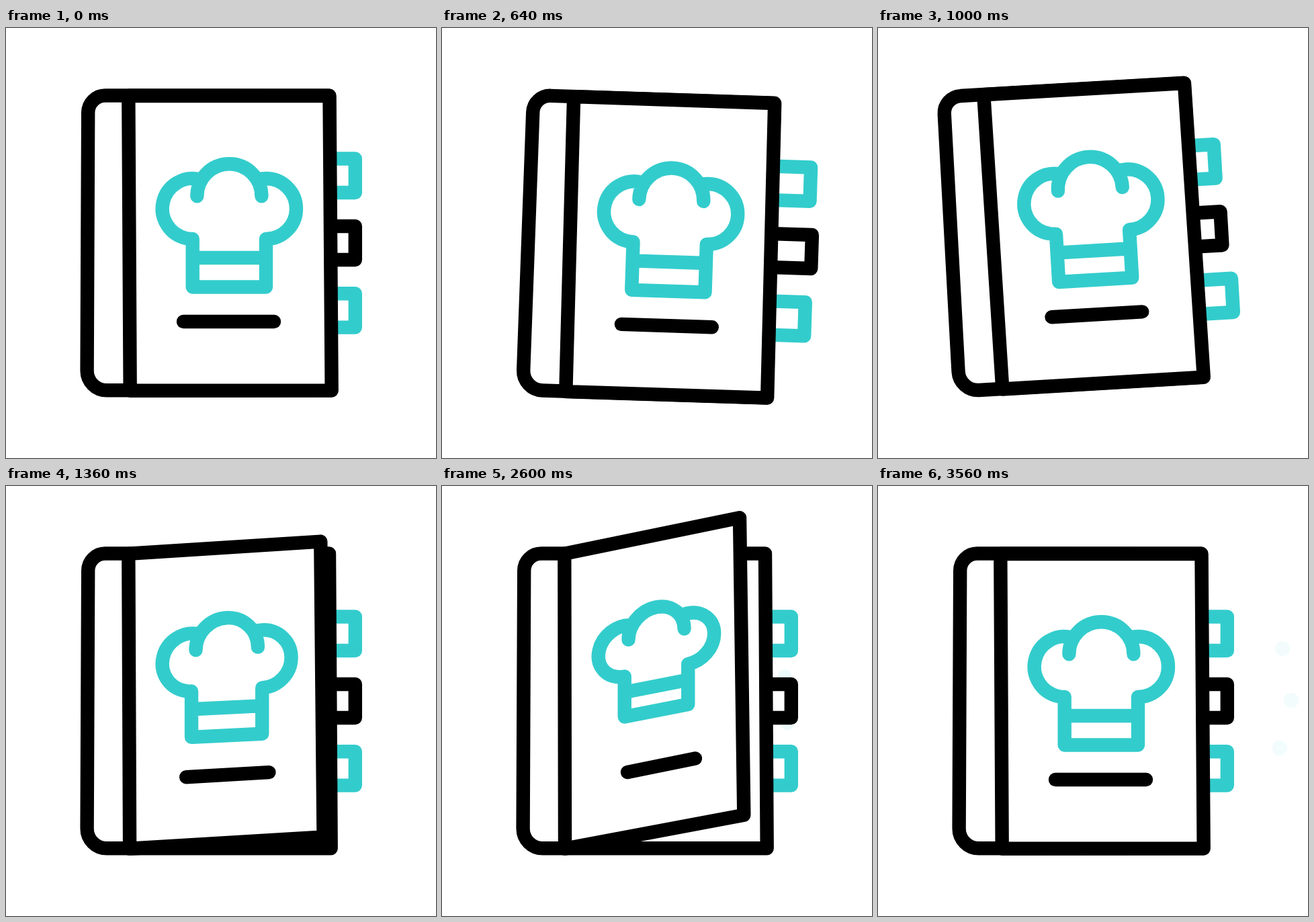
Write an HTML page with a canvas that moves like this. It is 640 px wide and 640 px high and loops after 3600 ms.

```html
<!DOCTYPE html>
<html lang="en">
<head>
<meta charset="utf-8">
<title>Recipe book</title>
<style>
  html, body { margin: 0; width: 100%; height: 100%; overflow: hidden; background: #fff; }
  canvas { display: block; width: 640px; height: 640px; }
</style>
</head>
<body>
<canvas id="stage" width="640" height="640"></canvas>
<script>
const ctx = document.getElementById('stage').getContext('2d');
const LOOP = 3600, STEP = 20;
const INK = '#000', TEAL = '#33cccc';
const PIVOT = [145, 528];

// Book tilt: [time, degrees], straight lines between
const TILT = [[45, 0], [325, -6], [605, 3], [881, -6], [1150, 0]];

// Index tabs: top, bottom, colour, time of furthest reach
const TABS = [
  [194.5, 245, TEAL, 500],
  [295, 345, INK, 670],
  [395.3, 445.6, TEAL, 805]
];
const TAB_REACH = 24, TAB_SPAN = 900;

// Sparks: start and end points
const SPARKS = [
  [[510, 283], [602, 242]],
  [[516, 321], [615, 319]],
  [[514, 353], [598, 390]]
];

const clamp = v => Math.min(1, Math.max(0, v));
const mix = (a, b, k) => a + (b - a) * k;
const mixPoint = (p, q, k) => [mix(p[0], q[0], k), mix(p[1], q[1], k)];
const part = (t, from, to) => clamp((t - from) / (to - from));
const ease = p => p * p * (3 - 2 * p);

function track(keys, t) {
  let value = keys[0][1];
  for (let i = 1; i < keys.length; i++) {
    const [t0, v0] = keys[i - 1], [t1, v1] = keys[i];
    if (t > t0) value = mix(v0, v1, part(t, t0, t1));
  }
  return value;
}

function line(points, close) {
  ctx.beginPath();
  points.forEach(p => ctx.lineTo(p[0], p[1]));
  if (close) ctx.closePath();
}

function paint(color, filled) {
  if (filled) {
    ctx.fillStyle = '#fff';
    ctx.fill();
  }
  ctx.strokeStyle = color;
  ctx.stroke();
}

function drawSparks(t) {
  if (t < 2600) return;
  const k = ease(part(t, 2600, 3400));
  ctx.globalAlpha = part(t, 2590, 2700) * (1 - part(t, 3250, 3580));
  ctx.fillStyle = TEAL;
  for (const [from, to] of SPARKS) {
    const [x, y] = mixPoint(from, to, k);
    ctx.beginPath();
    ctx.arc(x, y, 10.4 + 0.8 * k, 0, 7);
    ctx.fill();
  }
  ctx.globalAlpha = 1;
}

function drawTabs(t) {
  for (const [top, bottom, color, peak] of TABS) {
    const phase = Math.abs(t - peak) / TAB_SPAN;
    const out = phase < 0.5 ? TAB_REACH * Math.cos(Math.PI * phase) ** 2 : 0;
    const x = 519.8 + out;
    line([[430, top], [x, top], [x, bottom], [430, bottom]]);
    paint(color, true);
  }
}

function drawBlock() {
  ctx.beginPath();
  ctx.moveTo(481, 100.5);
  ctx.lineTo(148, 100.5);
  ctx.arcTo(122.3, 100.5, 122.2, 126, 25.5);
  ctx.lineTo(120.6, 510);
  ctx.arcTo(120.5, 539.3, 150, 539.3, 29.3);
  ctx.lineTo(483.7, 539.3);
  ctx.closePath();
  paint(INK, true);
}

function drawHat(k) {
  ctx.save();
  ctx.transform(mix(1, 0.865, k), -0.17 * k, 0, mix(1, 0.84, k), 31.5 * k, 66.9 * k);
  ctx.beginPath();
  // crown
  ctx.arc(332.4, 250.3, 48, Math.PI, 0);
  // side lobes and band
  ctx.moveTo(288, 225.3);
  ctx.arc(277.7, 269, 45, -1.34, Math.PI / 2, true);
  ctx.lineTo(277.7, 385.5);
  ctx.lineTo(387, 385.5);
  ctx.lineTo(387, 314);
  ctx.arc(387, 269, 45, Math.PI / 2, -1.83, true);
  ctx.moveTo(277.7, 342);
  ctx.lineTo(387, 342);
  ctx.restore();
  paint(TEAL);
}

function drawCover(open) {
  line([
    [182.3, 100.7],
    mixPoint([481.5, 101], [443, 47.3], open),
    mixPoint([484.7, 539.6], [449.3, 489.7], open),
    [mix(184.7, 183, open), 539.8]
  ], true);
  paint(INK, true);
  drawHat(open ** 1.2);
  line([
    mixPoint([264, 437], [276, 426], open),
    mixPoint([399, 437], [377, 405.5], open)
  ]);
  paint(INK);
}

function draw(t) {
  const open = ease(part(t, 1100, 1760)) - ease(part(t, 2590, 3270));
  ctx.fillStyle = '#fff';
  ctx.fillRect(0, 0, 640, 640);
  ctx.lineWidth = 20.4;
  ctx.lineCap = ctx.lineJoin = 'round';
  ctx.save();
  ctx.translate(...PIVOT);
  ctx.rotate(track(TILT, t) * Math.PI / 180);
  ctx.translate(-PIVOT[0], -PIVOT[1]);
  drawSparks(t);
  drawTabs(t);
  drawBlock();
  drawCover(open);
  ctx.restore();
}

const start = performance.now();
function tick() {
  const t = (performance.now() - start) % LOOP;
  draw(Math.floor(t / STEP) * STEP);
  requestAnimationFrame(tick);
}
tick();
</script>
</body>
</html>
```
